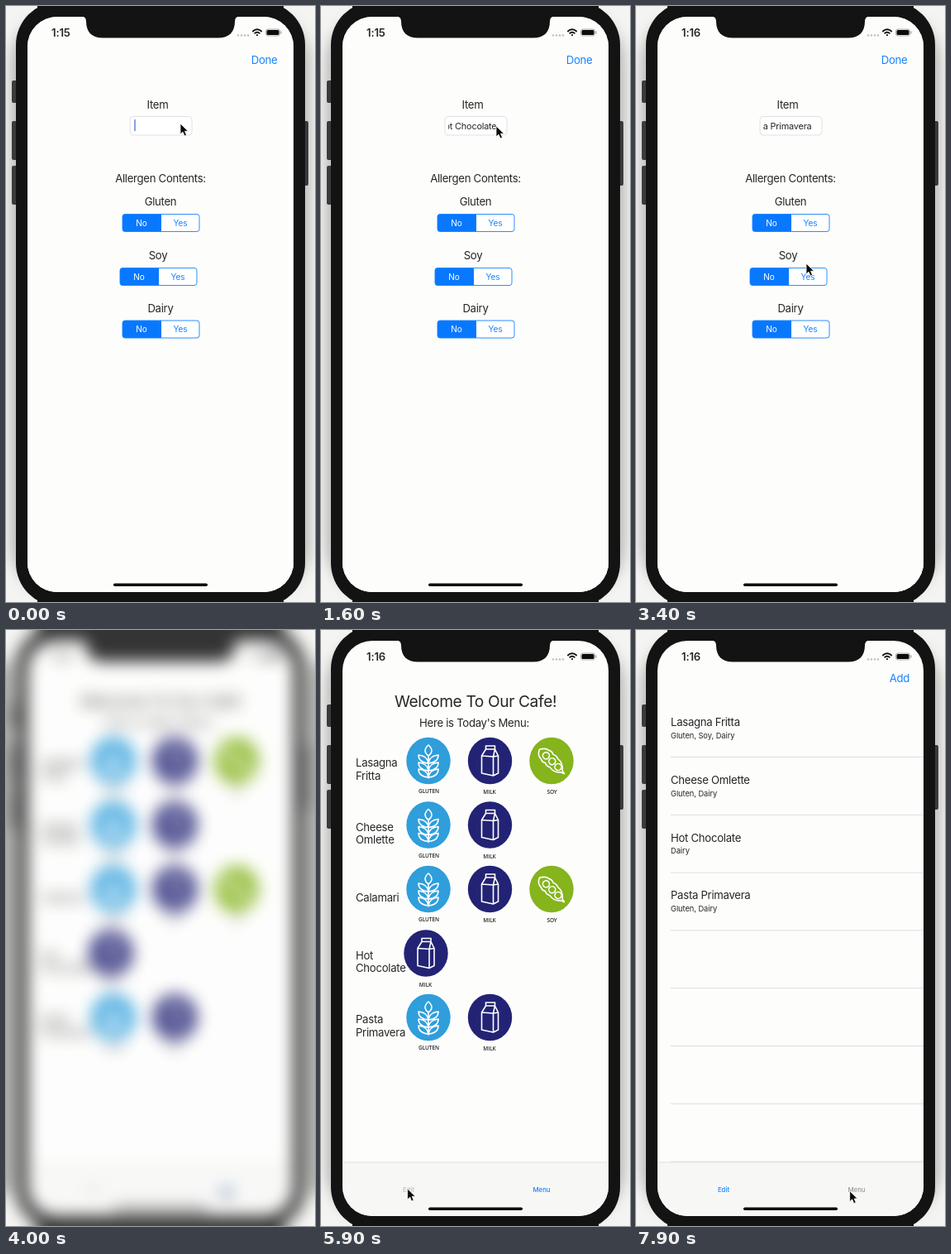
An HTML page that plays this animation: 374 px wide and 720 px high, repeating every 8000 ms.

```html
<!DOCTYPE html>
<html lang="en">
<head>
<meta charset="utf-8">
<title>Cafe menu app</title>
<style>
html, body { margin: 0; width: 100%; height: 100%; overflow: hidden; background: #f4f4f2; }
svg { display: block; width: 100vw; height: 100vh; }
text { font-family: Inter, Roboto, sans-serif; font-size: 13.2px; letter-spacing: -.3px; fill: #262626; }
.mid { text-anchor: middle; }
.end { text-anchor: end; }
.small { font-size: 9.3px; letter-spacing: -.05px; }
.seg { font-size: 10.1px; letter-spacing: -.1px; }
.field { font-size: 10.9px; letter-spacing: -.2px; }
.link { fill: #1683ff; }
.title { font-size: 19.2px; letter-spacing: -.4px; }
.tab { font-size: 7.8px; letter-spacing: 0; font-weight: 500; }
.tag { font: 600 6.5px "Open Sans", sans-serif; letter-spacing: -.1px; }
.time { font-weight: 600; letter-spacing: -.2px; }
.icon { fill: none; stroke: #fff; stroke-width: 1.6; stroke-linejoin: round; stroke-linecap: round; }
</style>
</head>
<body>
<svg viewBox="0 0 374 720" preserveAspectRatio="none">
  <defs>
    <filter id="glow" x="-20%" y="-10%" width="140%" height="120%"><feGaussianBlur stdDeviation="9"/></filter>
    <filter id="soft" filterUnits="userSpaceOnUse" x="-60" y="-60" width="494" height="840" color-interpolation-filters="sRGB"><feGaussianBlur id="blur" stdDeviation="0"/></filter>
    <clipPath id="screenClip"><rect x="26" y="13" width="322" height="695" rx="36"/></clipPath>
    <clipPath id="fieldClip"><rect x="154" y="134" width="67" height="22"/></clipPath>
  </defs>
  <g id="stage">
    <rect x="-60" y="-60" width="494" height="840" fill="#f4f4f2"/>
    <rect x="8" y="12" width="358" height="696" rx="55" fill="#929290" filter="url(#glow)" opacity=".75"/>
    <!-- margins beyond the stage, so the blur does not fade at its sides -->
    <path d="M-60 40H0V680H-60zM374 40H434V680H374z" fill="#8c8c8a"/>
    <g fill="#3a3a3a">
      <rect x="7" y="90" width="8" height="27" rx="2"/>
      <rect x="7" y="139" width="8" height="47" rx="2"/>
      <rect x="7" y="193" width="8" height="47" rx="2"/>
      <rect x="359" y="139" width="7" height="78" rx="2"/>
    </g>
    <g fill="#131313">
      <rect x="12" y="-5" width="350" height="730" rx="52"/>
      <rect x="38" y="-60" width="298" height="62"/>
      <rect x="38" y="718" width="298" height="62"/>
    </g>
    <rect x="26" y="13" width="322" height="695" rx="36" fill="#fdfdfc"/>
    <g id="screen" clip-path="url(#screenClip)"></g>
    <path d="M91 12.5q6 0 6 6c0 13 7 20 20 20h140c13 0 20-7 20-20q0-6 6-6z" fill="#131313"/>
    <text id="clock" class="time" x="55" y="36.5"></text>
    <g fill="#bdbdbd"><circle cx="281" cy="35.5" r="1.2"/><circle cx="285" cy="35.5" r="1.2"/><circle cx="289" cy="35.5" r="1.2"/><circle cx="293" cy="35.5" r="1.2"/></g>
    <g fill="none" stroke="#161616" stroke-width="1.8">
      <path d="M298.300 31q5.700-5.400 11.400 0M300.600 33.300q3.400-3.200 6.800 0"/>
      <path d="M303 35.200h2"/>
      <rect x="314.500" y="28" width="17" height="8" rx="2.300" stroke="#999" stroke-width=".8"/>
    </g>
    <rect x="315.500" y="29" width="15" height="6" rx="1.500" fill="#0c0c0c"/>
    <rect x="332.500" y="30.500" width="1" height="3" fill="#999"/>
    <rect x="130" y="697.500" width="114" height="3.500" rx="1.750" fill="#0c0c0c"/>
    <path id="cursor" d="M0 0v13l3-2.800 2 4.800 2.500-1-2-4.700h4z" fill="#0a0a0a" stroke="#fff" stroke-width=".8"/>
  </g>
  <rect id="wash" width="374" height="720" fill="#fff" opacity="0"/>
</svg>
<script>
const LOOP = 8000, STEP = 100, ROW = 69.8;
const $ = id => document.getElementById(id);

const DISHES = [
  ['Lasagna Fritta', 'Gluten, Soy, Dairy'],
  ['Cheese Omlette', 'Gluten, Dairy'],
  ['Calamari', 'Gluten, Soy, Dairy'],
  ['Hot Chocolate', 'Dairy'],
  ['Pasta Primavera', 'Gluten, Dairy']
];

// Each visit to the entry form: typing window, allergen taps, dismissal.
const NEVER = Infinity;
const FORMS = [
  { from: 0, shown: 0, type: [0, 200], done: 600, text: 'Calamari', taps: [300, 400, 500] },
  { from: 800, shown: 1100, type: [1200, 1600], done: 2000, text: 'Hot Chocolate', taps: [NEVER, NEVER, 1800] },
  { from: 2400, shown: 2600, type: [2700, 3200], done: 3700, text: 'Pasta Primavera', taps: [3500, NEVER, 3600] }
];

const CURSOR = [
  [0, 211, 142], [200, 212, 145], [300, 210, 260], [400, 208, 326], [500, 211, 389],
  [600, 316, 64], [900, 320, 66], [1100, 300, 90], [1200, 211, 143], [1600, 212, 145],
  [1800, 211, 389], [2000, 314, 64], [2400, 319, 55], [2500, 315, 58], [2700, 211, 143],
  [3200, 211, 146], [3400, 206, 311], [3500, 211, 260], [3600, 211, 389], [3700, 314, 64],
  [3900, 264, 674], [5000, 264, 674], [5700, 106, 675], [6000, 104, 675], [6400, 290, 258],
  [6700, 180, 258], [6900, 324, 258], [7200, 318, 265], [7700, 260, 675], [8000, 258, 679]
];
const BLUR = [[3700, 0], [4000, 9.5], [4200, 8.5], [4700, 0]];
const SWIPE = [[6400, 0], [6700, 60], [6900, 60], [7000, 322]];
const COLLAPSE = [[7000, 0], [7300, 1]];

function track(points, t, k = 1) {
  if (t <= points[0][0]) return points[0][k];
  const i = points.findIndex(p => p[0] > t);
  if (i < 0) return points[points.length - 1][k];
  const a = points[i - 1], b = points[i];
  return a[k] + (b[k] - a[k]) * (t - a[0]) / (b[0] - a[0]);
}

const text = (x, y, s, cls = '', extra = '') => `<text x="${x}" y="${y}" class="${cls}" ${extra}>${s}</text>`;
const line = y => `<path d="M42 ${y}H348" stroke="#d6d6d8" stroke-width=".8"/>`;

function tabs(active, pressed) {
  const tab = (x, name) => text(x, 679, name, 'tab mid',
    `style="fill:${name === active ? '#1683ff' : '#999'}" opacity="${name === pressed ? .6 : 1}"`);
  return `<rect x="26" y="643" width="322" height="66" fill="#f7f7f6"/>
    <path d="M26 643H348" stroke="#d8d8d8" stroke-width=".8"/>` + tab(106, 'Edit') + tab(267, 'Menu');
}

function list(t) {
  const count = t < 700 ? 2 : t < 2000 ? 3 : t < 3700 ? 4 : 5;
  const swipe = track(SWIPE, t), gone = track(COLLAPSE, t);
  let out = text(331, 63, 'Add', 'link end', `opacity="${t === 2400 ? .25 : 1}"`);
  DISHES.slice(0, count).forEach(([name, allergens], i) => {
    const removed = i === 2 && t >= 6400;
    if (removed && gone >= 1) return;
    const y = ROW * (i - (i > 2 ? gone : 0));
    if (removed && swipe > 0) {
      out += `<rect x="${348 - swipe}" y="${84 + y}" width="${swipe}" height="${ROW * (1 - gone)}" fill="#ff3b30"/>`;
      if (swipe < 100) out += text(348 - swipe / 2, 123 + y, 'Delete', 'mid', 'style="fill:#fff"');
    }
    const dx = removed ? -swipe : 0;
    out += text(42 + dx, 116 + y, name) + text(42 + dx, 130.800 + y, allergens, 'small');
  });
  for (let i = 0; i < 8; i++) out += line(153.500 + ROW * i);
  return out + tabs('Edit');
}

function segment(x, y, yes) {
  const half = 47;
  const color = on => `style="fill:${on ? '#fff' : '#1683ff'}"`;
  return `<rect x="${x}" y="${y}" width="93" height="21" rx="3" fill="#fff"/>
    <path d="${yes ? `M${x + half} ${y}h43q3 0 3 3v15q0 3-3 3h-43z` : `M${x + half} ${y}h-44q-3 0-3 3v15q0 3 3 3h44z`}" fill="#0878ff"/>
    <rect x="${x}" y="${y}" width="93" height="21" rx="3" fill="none" stroke="#1683ff" stroke-width=".9"/>`
    + text(x + 23, y + 14.200, 'No', 'seg mid', color(!yes)) + text(x + 70, y + 14.200, 'Yes', 'seg mid', color(yes));
}

function formView(f, t) {
  const slide = t < f.shown
    ? track([[f.from, 695], [f.from + 100, 637], [f.shown - 50, 60], [f.shown, 0]], t)
    : track([[f.done, 0], [f.done + 100, 420], [f.done + 200, 695]], t);
  const typed = Math.max(0, Math.min(1, (t - f.type[0]) / (f.type[1] - f.type[0])));
  const entry = f.text.slice(0, Math.round(f.text.length * typed));
  const long = entry.length > 11;
  const caret = t >= f.type[0] && !entry;
  return `<g transform="translate(0 ${slide})">
    <rect x="26" y="6" width="322" height="720" fill="#fdfdfc"/>`
    + text(328.500, 69.500, 'Done', 'link end', `opacity="${t === f.done ? .4 : 1}"`)
    + text(183.500, 123.500, 'Item', 'mid')
    + `<rect x="150" y="133.500" width="75" height="22.500" rx="4" fill="#fff" stroke="#dadada" stroke-width=".8"/>
    <g clip-path="url(#fieldClip)">${text(long ? 212.500 : 155.500, 148.500, entry, long ? 'field end' : 'field')}</g>`
    + (caret ? '<path d="M156 137v14" stroke="#4a6ee0" stroke-width="1.300"/>' : '')
    + text(187, 212.700, 'Allergen Contents:', 'mid')
    + text(187, 241.300, 'Gluten', 'mid') + segment(141, 251.500, t >= f.taps[0])
    + text(184, 306.300, 'Soy', 'mid') + segment(138, 316.500, t >= f.taps[1])
    + text(187, 370.300, 'Dairy', 'mid') + segment(141, 380, t >= f.taps[2])
    + '</g>';
}

const leaves = [3, 12, 20].map(y =>
  `M0 ${y}q1-9 12-10q0 9-12 10q-1-9-12-10q0 9 12 10`).join('');
const ICONS = {
  Gluten: ['#2f9edb', 'GLUTEN', `<path d="M0-19q8 7 0 13q-8-6 0-13${leaves}M0-6V21"/>`],
  Dairy: ['#232375', 'MILK', '<path d="M-5-18H6v4H-5zM-5-14L-10-6V15L4 18V-5L6-14L10-6V15L4 18M-10-6L4-5L10-6"/>'],
  Soy: ['#85b41d', 'SOY', `<g transform="rotate(43)"><path d="M-20 0q4-7 9-7q4-2 7 0q4-2 8 0q8-1 14 7q3 0 4 1q-3 1-4 1q-6 7-14 5q-4 2-8 0q-3 2-7 0q-6 0-9-7z"/>
    <circle cx="-9" r="4"/><circle cx="1" r="4"/><circle cx="11" r="4"/></g>`]
};

function badge(kind, x, y) {
  const [color, label, art] = ICONS[kind];
  return `<g transform="translate(${x} ${y})"><ellipse rx="26.700" ry="28.300" fill="${color}"/><g class="icon">${art}</g></g>`
    + text(x - (kind === 'Dairy' ? .5 : -.5), y + (kind === 'Gluten' ? 39 : 40), label, 'tag mid');
}

function menu(t) {
  let out = text(187, 92.500, 'Welcome To Our Cafe!', 'title mid') + text(185.500, 116.500, "Here is Today's Menu:", 'mid');
  DISHES.forEach(([name, allergens], i) => {
    const y = 158 + 77.500 * i, words = name.split(' ');
    words.forEach((w, k) => out += text(42, y + 15 + (words.length > 1 ? k * 15.500 - 8 : 0), w));
    const kinds = ['Gluten', 'Dairy', 'Soy'].filter(k => allergens.includes(k));
    kinds.forEach((k, n) => out += badge(k, (kinds.length > 1 ? 130 : 127) + n * 74.500, y));
  });
  return out + tabs('Menu', t >= 5800 ? 'Edit' : '');
}

function draw(t) {
  const f = FORMS.find(f => t >= f.from && t < f.done + 200);
  const onMenu = t >= 3900 && t < 6000;
  $('screen').innerHTML = onMenu ? menu(t) : list(t) + (f ? formView(f, t) : '');
  $('clock').textContent = t < 2800 ? '1:15' : '1:16';
  $('cursor').setAttribute('transform', `translate(${track(CURSOR, t)} ${track(CURSOR, t, 2)})`);
  const b = track(BLUR, t);
  $('blur').setAttribute('stdDeviation', b);
  if (b > 0) $('stage').setAttribute('filter', 'url(#soft)');
  else $('stage').removeAttribute('filter');
  $('wash').setAttribute('opacity', b * .015);
}

let last = -1;
const start = performance.now();
function tick() {
  const t = Math.floor((performance.now() - start) % LOOP / STEP) * STEP;
  if (t !== last) draw(last = t);
  requestAnimationFrame(tick);
}
tick();
</script>
</body>
</html>
```
